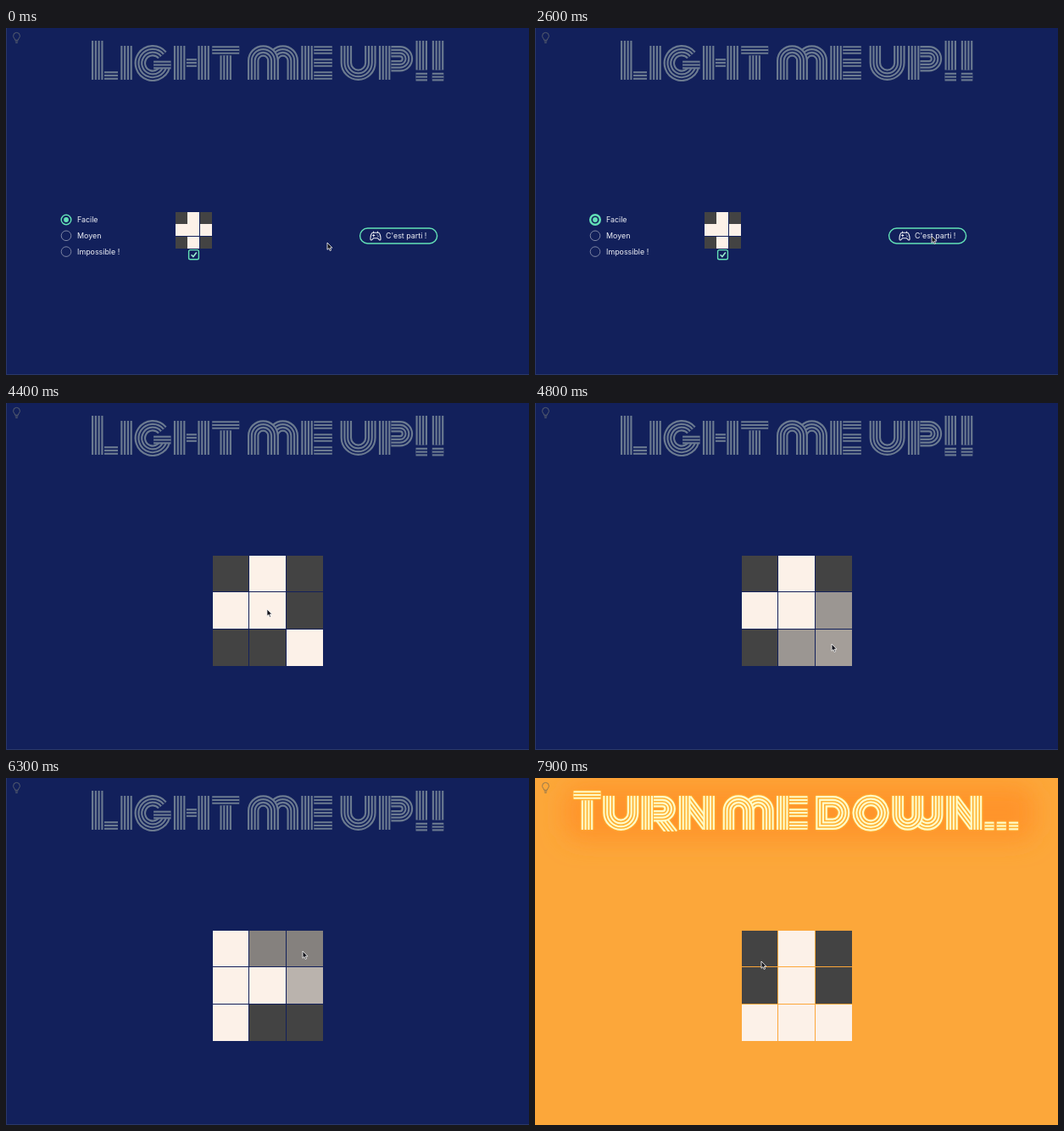
An HTML page for the animation above (8000 ms loop, 617 px wide and 409 px high).

```html
<!DOCTYPE html>
<html lang="fr">
<head>
<meta charset="utf-8">
<title>Light me up</title>
<style>
html, body { margin: 0; width: 100%; height: 100%; overflow: hidden; background: #12205b; }
svg { display: block; width: 617px; height: 409px; }
text { font: 8.9px Inter, "Noto Sans", sans-serif; fill: #eef0f6; }
</style>
</head>
<body>
<svg viewBox="0 0 617 409" xmlns="http://www.w3.org/2000/svg">
  <defs>
    <filter id="halo" filterUnits="userSpaceOnUse" x="-60" y="-60" width="740" height="240"><feGaussianBlur stdDeviation="14"/></filter>
    <filter id="near" filterUnits="userSpaceOnUse" x="0" y="0" width="617" height="100"><feGaussianBlur stdDeviation="1.2"/></filter>
    <mask id="nightMask" maskUnits="userSpaceOnUse" x="0" y="0" width="617" height="62.8"></mask>
    <mask id="dayMask" maskUnits="userSpaceOnUse" x="0" y="0" width="617" height="62.8"></mask>
  </defs>
  <rect id="back" width="617" height="409" fill="#12205b"/>

  <g id="night">
    <path d="M.5 0V408.5H617" fill="none" stroke="#36426f" opacity=".7"/>
    <rect width="617" height="90" fill="#6b7a90" mask="url(#nightMask)"/>
  </g>
  <g id="day">
    <rect x="34" y="8" width="556" height="66" rx="20" fill="#ff942b" filter="url(#halo)"/>
    <g filter="url(#near)" opacity=".75"><rect width="617" height="90" fill="#ffdf3c" mask="url(#dayMask)"/></g>
    <rect width="617" height="90" fill="#fffac8" mask="url(#dayMask)"/>
  </g>

  <g id="bulb" fill="none" stroke-width=".9" stroke-linejoin="round">
    <path d="M10.6 14.2C10.6 12.2 8.6 11.8 8.6 9.3A3.9 3.9 0 0 1 16.4 9.3C16.4 11.8 14.4 12.2 14.4 14.2Z"/>
    <path d="M10.8 15.8H14.2M11.3 17.4H13.7"/>
  </g>

  <g id="menu">
    <g id="radios"></g>
    <g id="preview"></g>
    <rect x="215.6" y="261.6" width="11.8" height="11.2" rx="1.8" fill="none" stroke="#63e2b7" stroke-width="1.4"/>
    <path d="M218.6 267.2L220.9 269.5L224.8 264.6" fill="none" stroke="#9becd0" stroke-width="1.6"/>
    <rect x="417.6" y="236" width="91" height="18" rx="9" fill="none" stroke="#63e2b7" stroke-width="1.4"/>
    <g fill="none" stroke="#eef0f6" stroke-width="1.1" stroke-linejoin="round" stroke-linecap="round">
      <path d="M432.6 241.3H439.4C441 241.3 442.2 246 442 249C441.8 250.6 440 250.3 438.6 247.8H433.4C432 250.3 430.2 250.6 430 249C429.8 246 431 241.3 432.6 241.3Z"/>
      <path d="M433.6 240V241M438.4 240V241M432.6 244.5H434.8M433.7 243.4V245.6M438 243.7V243.8M439 245.3V245.4"/>
    </g>
    <text x="448" y="248">C'est parti !</text>
  </g>

  <g id="board"></g>
  <path id="pointer" d="M0 0V8.3L1.9 6.6L3.2 9.5L4.6 8.9L3.3 6.1H5.9Z" fill="#15151c" stroke="#fff" stroke-width=".8" stroke-linejoin="round"/>
</svg>
<script>
const LOOP = 8000, FADE = 250, WIN = 6450;
const $ = id => document.getElementById(id);

function add(parent, tag, attrs, text) {
  const el = document.createElementNS('http://www.w3.org/2000/svg', tag);
  for (const k in attrs) el.setAttribute(k, attrs[k]);
  if (text) el.textContent = text;
  parent.appendChild(el);
  return el;
}

// Striped lettering: a glyph is its width and parts, each part some parallel lines along a path.
const LINE = 2.15, GAP = 1.63, SPACING = 3.3, SPACE = 6.5;
const stem = [4, 'M6.75 21V61'], stemR = [4, 'M35.25 21V61'];
const bowl = [4, 'M14.5 27.75H25A8.5 8.5 0 0 1 25 44.75H14.5'];
const glyphs = {
  L: [31, [4, 'M6.75 15V61'], [3, 'M15 56H31']],
  i: [13.5, stem],
  g: [42.5, [4, 'M32.3 32A14.75 14.75 0 1 0 35.75 42'], [3, 'M22 43.5H42.5']],
  h: [42, stem, stemR, [3, 'M15 41H27']],
  t: [32, [3, 'M0 26H32'], [4, 'M16 32.3V61']],
  T: [31.5, [3, 'M0 20H32'], [4, 'M16 26.3V61']],
  m: [60, [4, 'M30 61V38.6A11.6 11.6 0 0 1 53.25 38.6V61'], [4, 'M6.75 61V38.6A11.6 11.6 0 0 1 30 38.6V61']],
  w: [60.5, [4, 'M30 21V43.4A11.6 11.6 0 0 0 53.25 43.4V21'], [4, 'M6.75 21V43.4A11.6 11.6 0 0 0 30 43.4V21']],
  e: [36.5, stem, [3, 'M15 26H36.5M15 41H36.5M15 56H36.5']],
  u: [42, [4, 'M6.75 21V41A14.25 14.25 0 0 0 35.25 41V21']],
  p: [40.3, stem, bowl],
  r: [41, [4, 'M20 44L37 66'], stem, bowl],
  n: [42, [4, 'M9 25L33 57'], stem, stemR],
  d: [39.5, [4, 'M6.75 27.75H20A13.25 13.25 0 0 1 20 54.25H6.75Z']],
  o: [44, [4, 'M22 26.5A14.75 14.75 0 1 1 21.99 26.5Z']],
  '!': [16, [4, 'M6.75 15V49.5'], [3, 'M0 57.6H13.5']],
  '.': [11, [3, 'M0 56.5H11']]
};

function title(mask, words, x) {
  for (const char of words) {
    if (char === ' ') { x += SPACE; continue; }
    const [width, ...parts] = glyphs[char];
    const g = add(mask, 'g', { transform: `translate(${x} 0)`, fill: 'none' });
    for (const [count, d] of parts) {
      for (let n = count; n > 0; n -= 2) {
        const outer = n * LINE + (n - 1) * GAP;
        add(g, 'path', { d, stroke: '#fff', 'stroke-width': outer });
        if (n > 1) add(g, 'path', { d, stroke: '#000', 'stroke-width': outer - 2 * LINE });
      }
    }
    x += width + SPACING;
  }
}

title($('nightMask'), 'Light me up!!', 101);
title($('dayMask'), 'Turn me down...', 45.5);

const radios = ['Facile', 'Moyen', 'Impossible !'].map((label, i) => {
  const y = 226 + i * 18.8;
  const ring = add($('radios'), 'circle', {
    cx: 71, cy: y, r: 5.8, fill: 'none', 'stroke-width': i ? 1 : 1.4, stroke: i ? '#7c84a3' : '#63e2b7'
  });
  if (!i) add($('radios'), 'circle', { cx: 71, cy: y, r: 2.9, fill: '#63e2b7' });
  add($('radios'), 'text', { x: 84, y: y + 3.2 }, label);
  return ring;
});

const col = i => i % 3, row = i => Math.floor(i / 3);
const touches = (a, b) => Math.abs(col(a) - col(b)) + Math.abs(row(a) - row(b)) <= 1;
const smooth = p => p * p * (3 - 2 * p);
const clamp = p => Math.max(0, Math.min(1, p));

const OFF = [67, 67, 67], ON = [252, 241, 232];
const shade = p => `rgb(${OFF.map((v, i) => Math.round(v + (ON[i] - v) * p))})`;

// Cells sit on whole pixels, with a thin seam between them.
function grid(parent, x, y, pitch, size) {
  const span = (from, n) => {
    const at = from + n * pitch;
    return [Math.floor(at), Math.floor(at + size) - Math.floor(at)];
  };
  return Array.from({ length: 9 }, (_, i) => {
    const [left, width] = span(x, col(i)), [top, height] = span(y, row(i));
    return add(parent, 'rect', { x: left, y: top, width, height, fill: shade(touches(i, 4) ? 1 : 0) });
  });
}
grid($('preview'), 200, 217, 14.5, 14);
const cells = grid($('board'), 244, 180, 43.7, 42.65);

// A click flips a cell and its direct neighbours.
const clicks = [
  [3530, 6], [4080, 0], [4680, 8],
  [5780, 6], [5980, 0], [6200, 2], [WIN - 30, 8],
  [7330, 2], [7620, 0]
];

function light(cell, t) {
  let level = col(cell) <= row(cell) ? 1 : 0;
  for (const [at, hit] of clicks) {
    if (touches(cell, hit)) level += (1 - 2 * level) * smooth(clamp((t - at) / FADE));
  }
  return level;
}

// Pointer stops: time, x, y. It rests around each stop and glides to the next.
const LEAD = 50, REST = 100, GLIDE = 450;
const stops = [
  [0, 379, 253], [900, 70, 228], [1600, 212, 268], [1850, 468, 245], [3200, 471, 245],
  [5420, 319, 235.5], [7950, 267, 216],
  ...clicks.map(([at, i]) => [at, 268 + 41 * col(i), 204 + 40 * row(i)])
].sort((a, b) => a[0] - b[0]);

function pointerAt(t) {
  let [last, x, y] = stops[0];
  for (const [at, nx, ny] of stops.slice(1)) {
    const end = at - LEAD, begin = Math.max(last + REST, end - GLIDE);
    const p = smooth(clamp((t - begin) / (end - begin)));
    x += (nx - x) * p;
    y += (ny - y) * p;
    last = at;
  }
  return [x, y];
}

function draw(t) {
  const won = t >= WIN;
  $('back').setAttribute('fill', won ? '#fca73a' : '#12205b');
  $('night').style.display = won ? 'none' : '';
  $('day').style.display = won ? '' : 'none';
  $('bulb').setAttribute('stroke', won ? '#8a7450' : '#5d6470');

  const swap = clamp((t - 2750) / 250);
  $('menu').style.opacity = 1 - swap;
  $('board').style.opacity = swap;
  radios[0].setAttribute('stroke-width', t >= 900 ? 2.4 : 1.4);
  cells.forEach((c, i) => c.setAttribute('fill', shade(light(i, t))));

  const [x, y] = pointerAt(t);
  $('pointer').setAttribute('transform', `translate(${x} ${y})`);
}

function tick() {
  draw(performance.now() % LOOP);
  requestAnimationFrame(tick);
}
tick();
</script>
</body>
</html>
```
